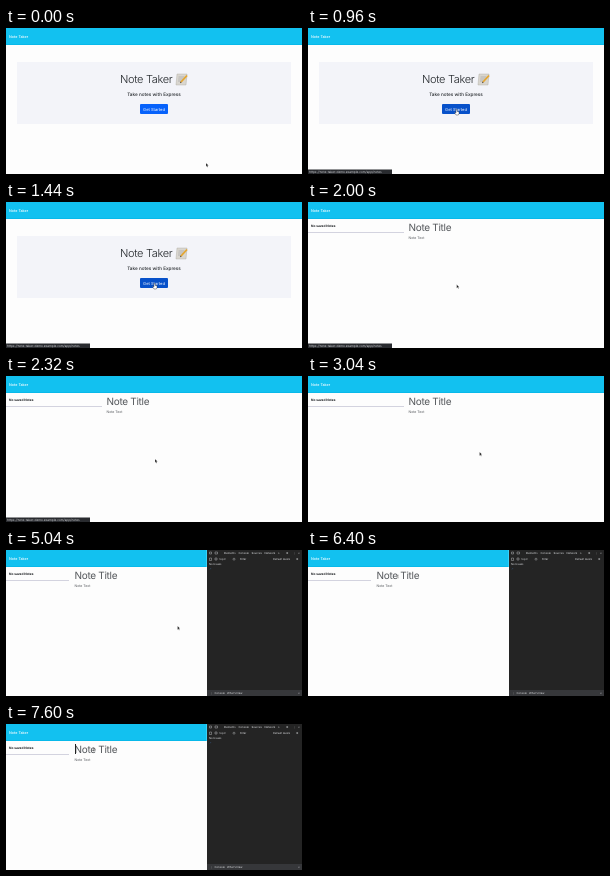
These frames come from a looping animation (296 px wide and 146 px high, 8000 ms). An HTML page:

```html
<!DOCTYPE html>
<html lang="en">
<head>
<meta charset="utf-8">
<title>Note Taker</title>
<style>
  html, body { margin: 0; height: 100%; overflow: hidden; background: #fdfdfd; }
  svg { display: block; width: 100vw; height: 100vh; }
  text { font-family: Inter, Roboto, sans-serif; text-rendering: geometricPrecision; }
  .mid { text-anchor: middle; }
  .tight { letter-spacing: -.03em; }
  #editor { fill: #55585c; }
  #tools text { font-size: 2.7px; fill: #dfe1e4; }
</style>
</head>
<body>
<svg viewBox="0 0 296 146">
  <rect width="296" height="17" fill="#12c1f0"/>
  <rect y="16" width="296" height="1" fill="#08b9ea"/>
  <text x="3" y="10.3" font-size="3.7" font-weight="500" fill="#fff">Note Taker</text>

  <g id="landing">
    <rect x="11" y="34" width="274" height="62" fill="#f3f4f9"/>
    <text class="tight" x="114" y="55" font-size="11" font-weight="300" fill="#212529">Note Taker</text>
    <g id="memo">
      <path d="M171 46h10l-1 11h-10z" fill="#d9d6cf" stroke="#aaa69e" stroke-width=".4"/>
      <path d="M172.5 49h6m-6.3 2h5m-5.2 2h4" stroke="#8f9194" stroke-width=".5"/>
      <path d="M175 54l6-6.500" stroke="#e5a52e" stroke-width="1.8"/>
      <path d="M174 55.200l.4-1.800 1.300 1.200z" fill="#4b4031"/>
    </g>
    <text class="mid" x="148" y="67.7" font-size="4.65" font-weight="500" fill="#212529">Take notes with Express</text>
    <rect id="button" x="134" y="76" width="28" height="10" rx="1"/>
    <text class="mid" x="148" y="82.5" font-size="4.05" fill="#fff">Get Started</text>
  </g>

  <g id="notes">
    <text x="3" y="24.6" font-size="3.2" font-weight="700" fill="#16191c">No saved Notes</text>
    <path id="divider" stroke="#c9cad8" stroke-width=".8"/>
    <g id="editor">
      <text class="tight" y="29" font-size="10">Note Title</text>
      <text y="37.3" font-size="3.5">Note Text</text>
    </g>
    <rect id="caret" x="69" y="20" width="1" height="10" fill="#222"/>
  </g>

  <g id="status">
    <rect y="141.5" width="84" height="4.5" fill="#292b2f"/>
    <text x="1" y="144.8" font-size="3.15" fill="#d3d5d8">https://note-taker-demo.example.com/app/notes</text>
  </g>

  <g id="tools">
    <rect x="200" width="1" height="17" fill="#38d2fa"/>
    <rect x="201" width="95" height="146" fill="#242424"/>
    <rect x="201" y="140" width="95" height="6" fill="#36373a"/>
    <path d="M203.5 2h2v2h-2zM209 2h2.500v2H209zM203.500 8h2v2.500h-2zM209 8h2v2h-2z" fill="none" stroke="#d0d2d5" stroke-width=".4"/>
    <text x="218" y="4">Elements</text>
    <text x="232.5" y="4">Console</text>
    <text x="245.5" y="4">Sources</text>
    <text x="258.5" y="4">Network</text>
    <text x="272" y="4">»</text>
    <text x="280" y="4">⚙</text>
    <text x="287" y="4">⋮</text>
    <text x="292" y="4">×</text>
    <text x="213.5" y="10.2">top ▾</text>
    <circle cx="228" cy="9.2" r="1" fill="none" stroke="#d0d2d5" stroke-width=".4"/>
    <text x="234" y="10.2">Filter</text>
    <text x="267" y="10.2">Default levels</text>
    <text x="290" y="10.2">⚙</text>
    <text x="203" y="15.2">No Issues</text>
    <path d="M204 18l.7.700-.7.700" fill="none" stroke="#3b6ca6" stroke-width=".4"/>
    <text x="204" y="144">⋮</text>
    <text x="208.5" y="144">Console</text>
    <text x="221" y="144">What's New</text>
    <text x="292" y="144">×</text>
  </g>

  <g id="pointer">
    <path id="arrow" d="M0 0V3.700L.9 2.900 1.500 4.300 2.100 4 1.500 2.600H2.600z" fill="#111" stroke="#fff" stroke-width=".3"/>
    <path id="hand" d="M0 0q.5-.5 1 0v1.700l2 .5v2L2.300 5.500H0L-1.400 3.300l.5-.5.9.6z" fill="#fff" stroke="#222" stroke-width=".4"/>
    <path id="beam" d="M-.5-1.500h1M0-1.500v3M-.5 1.500h1" fill="none" stroke="#222" stroke-width=".3"/>
  </g>
</svg>
<script>
const LOOP = 8000, STEP = 80;
const PAGE = 1760, STATUS_ON = 560, STATUS_OFF = 2640, TOOLS = 5040;
const $ = id => document.getElementById(id);
const show = (id, on) => $(id).style.display = on ? '' : 'none';

// time, x, y
const path = [
  [0, 200, 135], [80, 225, 108], [160, 180, 52], [240, 158, 72], [320, 148, 81.5],
  [1440, 148, 81.5], [2320, 149, 83], [3040, 171.5, 76], [5440, 171.5, 76],
  [5520, 196, 46], [5600, 231, 4], [5680, 207, 56], [5840, 207, 56],
  [6400, 90, 26.5], [6640, 87.5, 25.5], [LOOP, 87.5, 25.5]
];

function pointerAt(t) {
  const i = path.findIndex(p => p[0] > t);
  const [t0, x0, y0] = path[i - 1], [t1, x1, y1] = path[i];
  const u = (t - t0) / (t1 - t0), k = u * u * (3 - 2 * u);
  return [x0 + (x1 - x0) * k, y0 + (y1 - y0) * k];
}

function draw(now) {
  const t = Math.floor(now % LOOP / STEP) * STEP;
  const landing = t < PAGE, docked = t >= TOOLS;
  const hover = landing && t >= 320;
  const typing = t >= 6240;

  show('landing', landing);
  show('notes', !landing);
  show('status', t >= STATUS_ON && t < STATUS_OFF);
  show('tools', docked);
  show('caret', t >= 6560 && (t < 7040 || t >= 7600));
  $('button').setAttribute('fill', hover ? '#0751ca' : '#0762fb');
  $('divider').setAttribute('d', `M0 30.5H${docked ? 63 : 96}`);
  $('editor').setAttribute('transform', `translate(${docked ? 68.5 : 100.5})`);

  show('hand', hover);
  show('beam', typing);
  show('arrow', !hover && !typing);
  $('pointer').setAttribute('transform', `translate(${pointerAt(t)})`);
  requestAnimationFrame(draw);
}
requestAnimationFrame(draw);
</script>
</body>
</html>
```
